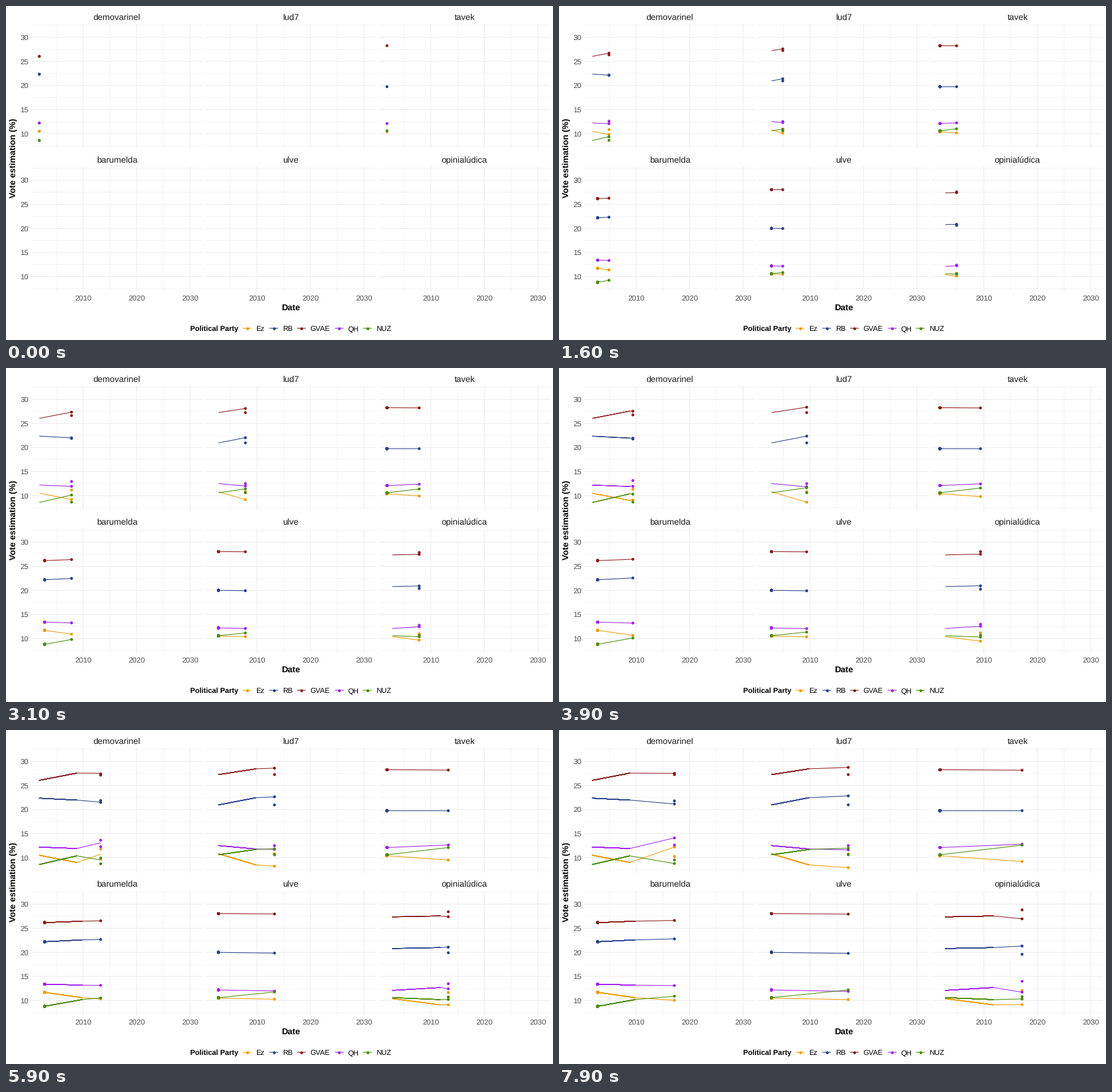
Animation, 900 px wide and 550 px high, one loop 8 s. Source, as a matplotlib script:

```python
from collections import namedtuple

import matplotlib.pyplot as plt
import numpy as np
from matplotlib.animation import FuncAnimation
from matplotlib.collections import LineCollection

W, H, DPI = 900, 550, 100
PX = 72 / DPI
FRAMES, INTERVAL = 80, 100
FIRST, LAST = 2001.8, 2017.15
STEP = (LAST - FIRST) / (FRAMES - 1)
DOT = (4.7 * PX) ** 2
THIN = 1.07

plt.rcParams.update({"font.family": "Liberation Sans", "text.hinting": "none"})

PARTIES = ["Ez", "RB", "GVAE", "QH", "NUZ"]
COLORS = ["#EE9A00", "#27408B", "#8B1A1A", "#A020F0", "#458B00"]
KEYS = [396.5, 440.5, 486, 548.3, 594.5]

# Change per party over the whole span for series that run against the trend.
REBOUND = np.array([1.7, -1.2, 1.45, 1.9, 0.2])

# lean, small: starting level; drift: change per party up to the bend;
# grow, turn: how drift and rebound add up at the end;
# pull: rebound share of the second dot (None: it stays at the start).
Panel = namedtuple("Panel", "name delay bend lean small drift grow turn pull")
PANELS = [
    Panel("demovarinel", 0, 7, 1.35, 0, [-1.5, -0.4, 1.5, -0.3, 1.8], 0.5, 0.3, 1),
    Panel("lud7", 1, 8, -0.05, 0.3, [-2.3, 1.5, 1.2, -0.7, 1.1], 1.25, 0, 0),
    Panel("tavek", 0, None, -1.25, -0.1, [-1.2, 0, -0.1, 0.7, 2], 1, 0, None),
    Panel("barumelda", 1, 8, 1.2, 1.2, [-1.1, 0.4, 0.3, -0.2, 1.4], 1.5, 0, None),
    Panel("ulve", 1, None, -1, 0, [-0.3, -0.2, -0.1, -0.3, 1.6], 1, 0, None),
    Panel("opinialúdica", 1, 10, -0.2, -0.1, [-1.3, 0.2, 0.2, 0.6, -0.4], 0.5, -0.35, 1),
]


def start_levels(lean, small):
    """The two big parties trade votes; the small ones share the rest."""
    return np.array([10.5 + small, 21 + lean, 27.2 - 0.85 * lean,
                     12.2 + small, 10.6 - 1.5 * max(lean, 0)])


def tracks(p):
    """Key years and values (rows: years, columns: parties) of a panel."""
    first = start_levels(p.lean, p.small)
    drift = np.array(p.drift)
    years, main = [FIRST + p.delay], [first]
    if p.bend:
        years.append(FIRST + p.bend)
        main.append(first + drift)
    years.append(LAST)
    main.append(first + p.grow * drift + p.turn * REBOUND)
    second = None if p.pull is None else [first, first + p.pull * REBOUND]
    # a series that turns back up ends its line on the second dot
    line = main[:-1] + [second[-1] if p.turn > 0 else main[-1]]
    return years, np.array(main), np.array(line), second


DATA = [tracks(p) for p in PANELS]

fig = plt.figure(figsize=(W / DPI, H / DPI), dpi=DPI, facecolor="white")
ax = fig.add_axes([0, 0, 1, 1])
ax.set(xlim=(0, W), ylim=(H, 0))
ax.axis("off")


def px(year, col):
    return 127 + 8.8 * (year - 2010) + 286 * col


def py(value, row):
    return 210.2 - 7.93 * (value - 10) + 235.3 * row


def text(x, y, s, size=12, color="black", **kw):
    ax.text(x, y, s, fontsize=size * PX, color=color, va="baseline", **kw)


def rule(xs, ys, width=THIN, color="#EBEBEB"):
    ax.plot(xs, ys, color=color, lw=width * PX, snap=False,
            solid_capstyle="butt", zorder=1)


def draw_panel(i, name):
    row, col = divmod(i, 3)
    left, top = 42 + 286 * col, 29.2 + 235.3 * row
    right, bottom = left + 281, top + 206
    for k in range(11):
        y = py(7.5 + 2.5 * k, row)
        rule([left, right], [y, y], THIN if k % 2 else THIN / 2)
    for k in range(6):
        x = px(2005 + 5 * k, col)
        rule([x, x], [top, bottom], THIN if k % 2 else THIN / 2)
    text((left + right) / 2, 23 + 235.3 * row, name, 14.2, "#1A1A1A", ha="center")
    if col == 0:
        for value in range(10, 31, 5):
            text(37, py(value, row) + 4.4, value, 12.4, "#4D4D4D", ha="right")
    if row == 1:
        for year in (2010, 2020, 2030):
            text(px(year, col), 485.3, year, 12.4, "#4D4D4D", ha="center")


for i, p in enumerate(PANELS):
    draw_panel(i, p.name)

text(468.5, 501, "Date", 14.2, ha="center", weight="bold")
text(16, 250, "Vote estimation (%)", 14.2, ha="center", weight="bold",
     rotation=90, rotation_mode="anchor")

text(303, 535.3, "Political Party", weight="bold")
for x, label, color in zip(KEYS, PARTIES, COLORS):
    rule([x - 7.2, x + 7.2], [530.6, 530.6], color=color)
    ax.scatter([x], [530.6], s=DOT, c=color, lw=0, snap=False, zorder=3)
    text(x + 14.5, 535.3, label)

lines = LineCollection([], linewidths=THIN * PX, snap=False, zorder=2,
                       capstyle="butt")
ax.add_collection(lines, autolim=False)
dots = ax.scatter([], [], s=DOT, lw=0, snap=False, zorder=3)


def steps_since(year, now):
    return max(0, round((now - year) / STEP))


def update(frame):
    now = FIRST + STEP * frame
    segs, seg_colors, spots, spot_colors = [], [], [], []

    def add_line(path, color, copies=1):
        segs.extend([path] * copies)
        seg_colors.extend([color] * copies)

    def add_dot(spot, color, copies=1):
        spots.extend([spot] * copies)
        spot_colors.extend([color] * copies)

    for i, (years, main, line, second) in enumerate(DATA):
        start = years[0]
        if now < start - STEP / 2:
            continue
        row, col = divmod(i, 3)
        t = max(now, start)

        def at(year, xs, values):
            return px(year, col), py(np.interp(year, xs, values), row)

        for k, color in enumerate(COLORS):
            path = [at(y, years, line[:, k]) for y in years if y < t]
            path.append(at(t, years, line[:, k]))
            add_line(path, color)
            # a finished stretch is painted again on every step
            if len(path) > 2:
                add_line(path[:2], color, steps_since(years[1], now))

            if second is None:
                add_dot(at(start, years, main[:, k]), color,
                        steps_since(start, now))
            else:
                ends = [values[k] for values in second]
                add_dot(at(t, [start, LAST], ends), color)
            add_dot(at(t, years, main[:, k]), color)

    lines.set_segments(segs)
    lines.set_color(seg_colors)
    dots.set_offsets(spots)
    dots.set_facecolor(spot_colors)
    return lines, dots


anim = FuncAnimation(fig, update, frames=FRAMES, interval=INTERVAL,
                     repeat=True, repeat_delay=0)
plt.show()
```
